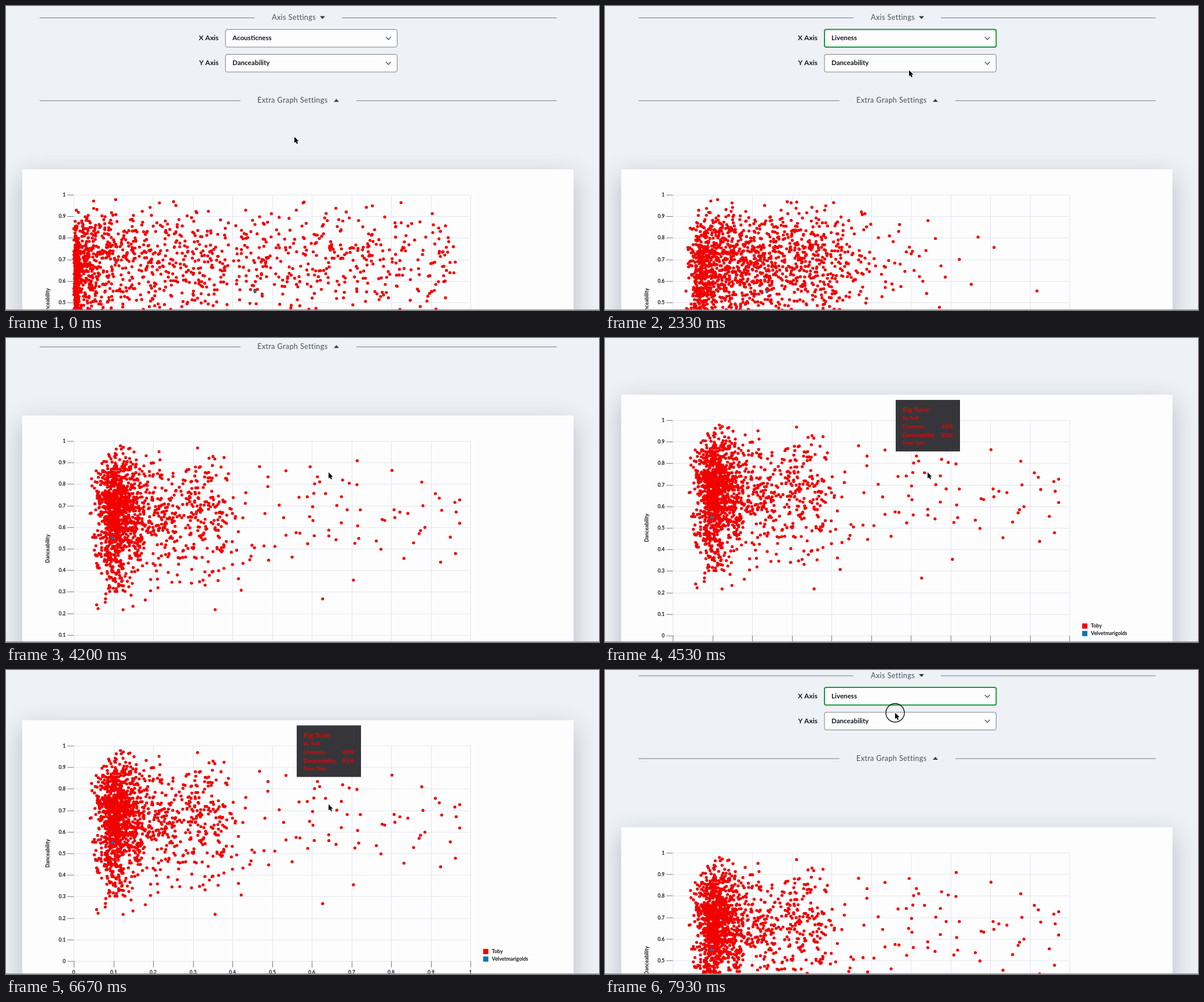
Write an HTML page with a canvas that moves like this. It is 1024 by 525 pixels and loops after 8 s.

```html
<!DOCTYPE html>
<html lang="en">
<head>
<meta charset="utf-8">
<title>Audio feature scatter plot</title>
<style>
html, body { margin: 0; height: 100%; overflow: hidden; background: #eef1f5; }
canvas { display: block; }
</style>
</head>
<body>
<canvas id="stage" width="1024" height="525"></canvas>
<script>
const LOOP = 8000, W = 1024, H = 525;
const ctx = document.getElementById('stage').getContext('2d');
const SANS = 'Lato, "Open Sans", sans-serif';
const PAGE = '#eef1f5', CARD = '#fdfdfe', INK = '#16181f', SLATE = '#4a5160';
const RED = '#f20000', BLUE = '#0f74b0', GRID = '#e3e5ee', TICK = '#77797e';
const OPTIONS = ['Acousticness', 'Danceability', 'Energy', 'Instrumentalness',
  'Liveness', 'Speechiness', 'Valence'];

// Timeline (ms)
const OPEN = 1070, PICK = 2250, MORPH = 300, TIP_ON = 4340, TIP_OFF = 7560;
const CLICKS = [[960, 1130], [2150, 2310], [7800, 8000]];
// Cursor moves: start, end, x, y
const REST = [498, 226];
const MOVES = [[150, 930, 549, 65], [1450, 2080, 525, 111], [2400, 2800, 524, 104],
  [3530, 4200, 557, 232], [7540, 7870, 501, 74]];

const clamp = (v, lo = 0, hi = 1) => Math.max(lo, Math.min(hi, v));
const mix = (a, b, p) => a + (b - a) * p;
const smooth = p => p * p * (3 - 2 * p);
const easeOut = (p, n) => 1 - Math.pow(1 - clamp(p), n);
const px = v => 117 + 685 * v;
const py = v => 698 - 372 * v;

let seed = 20;
function rand() {
  seed = (seed * 1664525 + 1013904223) % 4294967296;
  return seed / 4294967296;
}
const gauss = () => Math.sqrt(-2 * Math.log(1 - rand())) * Math.cos(2 * Math.PI * rand());

// Skewed to zero, with a dense strip on the axis
const acoustic = () => rand() < 0.1 ? 0.015 * rand() : 0.003 + 0.96 * Math.pow(rand(), 2.7);

// A narrow peak, a wider one, a shelf and a thin tail
function liveness() {
  const kind = rand();
  if (kind < 0.34) return 0.106 + 0.017 * gauss();
  if (kind < 0.66) return Math.max(0.015, 0.115 * Math.exp(0.38 * gauss()));
  if (kind < 0.93) return 0.13 + 0.25 * rand();
  return 0.38 + 0.6 * Math.pow(rand(), 1.5);
}

function dance(a) {
  const g = gauss();
  const d = (a < 0.02 ? 0.61 : 0.695) + g * (g < 0 ? 0.155 : 0.115);
  return d < 0.17 || d > 0.98 ? dance(a) : d;
}

// Each dot: x as acousticness, x as liveness, y
const dots = Array.from({ length: 1550 }, () => {
  const a = acoustic();
  return [px(a), px(liveness()), py(dance(a))];
});

function text(str, x, y, size, o = {}) {
  ctx.font = `${o.weight || 700} ${size}px ${o.font || SANS}`;
  ctx.letterSpacing = (o.spacing || 0) + 'px';
  ctx.textAlign = o.align || 'left';
  ctx.textBaseline = 'middle';
  ctx.fillStyle = o.color || INK;
  ctx.fillText(str, x, y);
}
function rect(x, y, w, h, color) {
  ctx.fillStyle = color;
  ctx.fillRect(x, y, w, h);
}
function path(points, close) {
  ctx.beginPath();
  points.forEach(([x, y]) => ctx.lineTo(x, y));
  if (close) ctx.closePath();
}
function stroke(color, width) {
  ctx.strokeStyle = color;
  ctx.lineWidth = width;
  ctx.stroke();
}
function fill(color) {
  ctx.fillStyle = color;
  ctx.fill();
}
function circle(x, y, r) {
  ctx.beginPath();
  ctx.arc(x, y, r, 0, 2 * Math.PI);
}
function shadowed(color, blur, dy, drawShape) {
  ctx.save();
  ctx.shadowColor = color;
  ctx.shadowBlur = blur;
  ctx.shadowOffsetY = dy;
  drawShape();
  ctx.restore();
}

function heading(label, x, y, left, right, arrowX, dir) {
  rect(58, y, left - 58, 1, '#757c8a');
  rect(right, y, 951 - right, 1, '#757c8a');
  text(label, x, y + 0.5, 12.7, { weight: 400, spacing: 0.35, color: SLATE });
  path([[arrowX - 4.5, y - 2.5 * dir], [arrowX + 4.5, y - 2.5 * dir], [arrowX, y + 2.5 * dir]], true);
  fill('#363c4a');
}

function select(label, value, y, focused) {
  text(label, 367, y + 15.5, 12, { align: 'right' });
  ctx.beginPath();
  ctx.roundRect(379, y + 0.5, 296.5, 30.5, 3);
  fill(CARD);
  stroke(focused ? '#169a3a' : '#7c808a', focused ? 2 : 1);
  text(value, 391, y + 15.5, 11.6);
  path([[656, y + 13.5], [660.3, y + 18], [664.6, y + 13.5]]);
  stroke('#50545e', 1.4);
}

function menu(active) {
  shadowed('rgba(40,45,60,.4)', 12, 3, () => {
    ctx.beginPath();
    ctx.roundRect(377, 41, 299, 112.5, 5);
    fill('#dcdee1');
  });
  OPTIONS.forEach((name, i) => {
    const y = 50 + 15.3 * i, on = i === active;
    if (on) rect(377, y - 7.7, 299, 16, '#b03cb0');
    const o = { weight: 400, font: '"Liberation Sans", Arial, sans-serif',
      color: on ? '#fff' : i === 1 ? '#a3a5a9' : '#111' };
    text(name, 393.5, y + 0.5, 12.05, o);
    if (i === 0) text('✓', 382, y + 0.5, 11, { ...o, font: '"DejaVu Sans", sans-serif' });
  });
}

function chart(morph) {
  shadowed('rgba(70,80,100,.32)', 40, 14, () => rect(28, 282, 952, 560, CARD));

  for (let i = 0; i <= 10; i++) {
    const x = Math.round(px(i / 10)), y = Math.round(py(i / 10)), label = String(i / 10);
    rect(x, 326, 1, 372, GRID);
    rect(117, y, 685, 1, GRID);
    rect(106, y, 11, 1, TICK);
    rect(x, 698, 1, 11, TICK);
    text(label, 103, y + 0.5, 8.6, { align: 'right' });
    text(label, x, 717.5, 8.6, { align: 'center' });
  }
  ctx.save();
  ctx.translate(72.5, 512);
  ctx.rotate(-Math.PI / 2);
  text('Danceability', 0, 0, 8.9, { align: 'center' });
  ctx.restore();

  ctx.beginPath();
  for (const [a, l, y] of dots) {
    const x = mix(a, l, morph);
    ctx.moveTo(x + 2.6, y);
    ctx.arc(x, y, 2.6, 0, 2 * Math.PI);
  }
  fill(RED);
  circle(mix(430, 184, morph), 493.5, 2.6);
  fill(BLUE);

  rect(824, 677, 9, 9, RED);
  rect(824, 690, 9, 9, BLUE);
  text('Toby', 839, 681.5, 8.8);
  text('Velvetmarigolds', 839, 694.5, 8.8);
}

function tooltip() {
  rect(502, 291, 111, 89, '#36363a');
  const o = { color: RED }, right = { ...o, align: 'right' };
  text('Fig Tune', 514, 308.5, 12.2, o);
  text('By Trell', 514, 323, 8.4, o);
  text('Liveness', 514, 337.5, 9.9, o);
  text('65%', 601, 337.5, 9.9, right);
  text('Danceability', 514, 352, 9.9, o);
  text('81%', 601, 352, 9.9, right);
  text('From Toby', 514, 365.5, 8.4, o);
}

function cursorAt(t) {
  return MOVES.reduce(([x, y], [from, to, toX, toY]) => {
    const p = smooth(clamp((t - from) / (to - from)));
    return [mix(x, toX, p), mix(y, toY, p)];
  }, REST);
}

function drawCursor(x, y, clicking) {
  if (clicking) {
    circle(x, y, 16);
    stroke('#111', 1.4);
  }
  path([[0, 0], [0, 10.5], [2.4, 8.4], [4.2, 12.2], [6, 11.3], [4.3, 7.6], [7.6, 7.4]]
    .map(([dx, dy]) => [x + dx, y + dy]), true);
  stroke('#fff', 1.6);
  fill('#000');
}

// One flick down the page, later one back up
function scrollAt(t) {
  const down = 195.6 * easeOut((t - 3550) / 1320, 2.085);
  return down - 185.1 * easeOut((t - 6670) / 930, 1.4);
}

function draw(t) {
  const [cx, cy] = cursorAt(t);
  const picked = t >= PICK;
  rect(0, 0, W, H, PAGE);

  ctx.save();
  ctx.translate(0, -scrollAt(t));
  chart(easeOut((t - PICK) / MORPH, 3));
  heading('Axis Settings', 459, 20, 429, 580, 546.5, 1);
  select('X Axis', picked ? 'Liveness' : 'Acousticness', 40, t >= OPEN);
  select('Y Axis', 'Danceability', 83, false);
  heading('Extra Graph Settings', 434, 163, 405, 605, 570.5, -1);
  if (t >= OPEN && !picked) {
    const row = Math.floor((cy - 42) / 15.3);
    menu(row < 2 ? 0 : Math.min(row, 4));
  }
  if (t >= TIP_ON && t < TIP_OFF) tooltip();
  ctx.restore();

  rect(0, H - 1, W, 1, '#85888e');
  drawCursor(cx, cy, CLICKS.some(([a, b]) => t >= a && t < b));
}

const start = performance.now();
function frame() {
  draw((performance.now() - start) % LOOP);
  requestAnimationFrame(frame);
}
frame();
</script>
</body>
</html>
```
